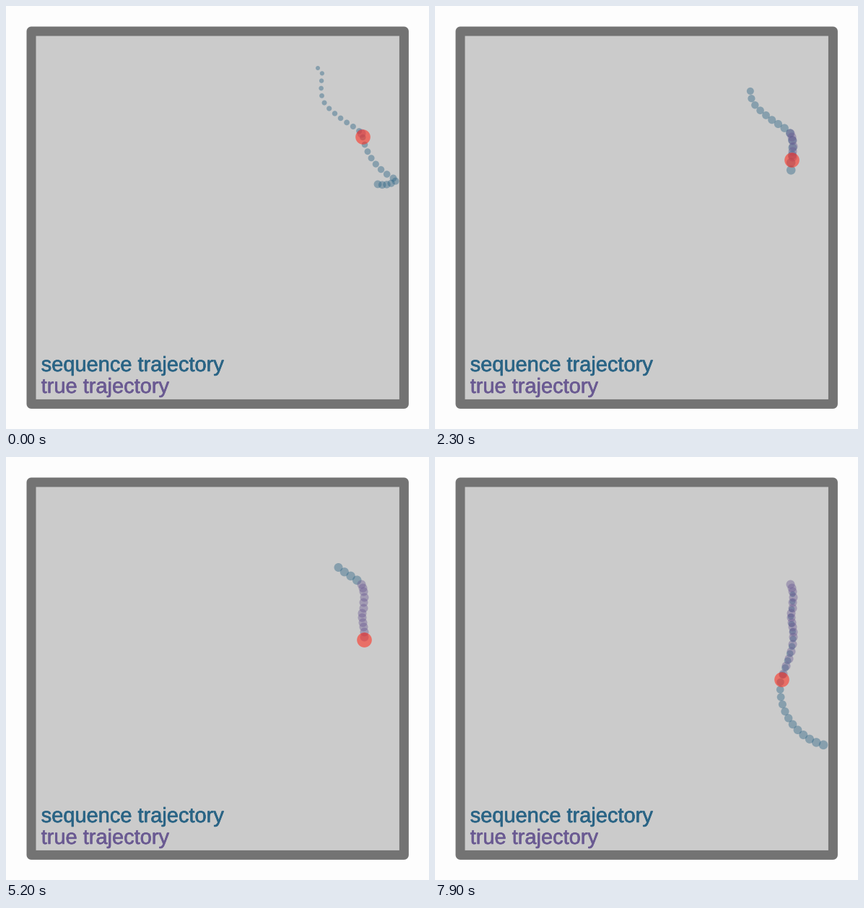
Write a matplotlib script that moves like this. It is 586 by 586 pixels and loops after 8 s.

```python
import numpy as np
import matplotlib.pyplot as plt
from matplotlib.animation import FuncAnimation
from matplotlib.patches import Rectangle
from matplotlib.patheffects import withStroke

SIZE, DPI = 586, 100
PX = 72 / DPI
FRAMES, INTERVAL = 80, 100
CYCLE = 5                 # frames per sweep
BEHIND, AHEAD = 13, 12    # sweep dots on the walked path and beyond it
STEP = 10.4               # spacing of the sweep dots
WALL = 542
BLUE, PURPLE, RED = "#2a6485", "#6a5a92", "#ff2d1e"

# Key points of the walked path, and the height reached at key times.
KEYS = [(432, 86), (438, 94), (436.5, 112), (441, 134), (463, 155), (489, 173),
        (495, 186), (495, 205), (493, 222), (496, 253), (489, 281), (479, 310),
        (477, 326)]
PACE = [(-5, 176), (5, 186), (20, 209), (50, 248.5), (85, 320)]

# First and last heading (degrees, 90 is down) of the sweeps that reach the wall.
WIDE = {-1: (75, -5), 1: (85, 30), 11: (115, 5), 15: (92, 12)}


def spline(keys, n=24):
    """Catmull-Rom curve through the key points."""
    k = np.array(keys, float)
    k = np.vstack([2 * k[0] - k[1], k, 2 * k[-1] - k[-2]])
    t = np.linspace(0, 1, n, endpoint=False)[:, None]
    parts = [b + t * (c - a) / 2 + t**2 * (a - 2.5 * b + 2 * c - d / 2)
             + t**3 * (1.5 * (b - c) + (d - a) / 2)
             for a, b, c, d in zip(k, k[1:], k[2:], k[3:])]
    return np.vstack(parts + [k[-2:-1]])


TRACK = spline(KEYS)
ARC = np.r_[0, np.cumsum(np.hypot(*np.diff(TRACK, axis=0).T))]


def track_at(dist):
    return np.column_stack([np.interp(dist, ARC, axis) for axis in TRACK.T])


def walked(frame):
    """Distance along the track at a given frame."""
    y = np.interp(frame, *np.transpose(PACE))
    return np.interp(y, TRACK[:, 1], ARC)


def sweep(cycle):
    """Dots along the walked path, then along a steadily turning one."""
    past = track_at(walked(CYCLE * cycle + 6) + STEP * np.arange(1 - BEHIND, 1))
    side = 1 if cycle % 2 else -1
    first, last = WIDE.get(cycle, (90, 90 - 30 * side))
    heading = np.radians(np.linspace(first, last, AHEAD))
    moves = STEP * np.column_stack([np.cos(heading), np.sin(heading)])
    dots = np.vstack([past, past[-1] + np.cumsum(moves, axis=0)])
    over = np.maximum(dots[:, 0] - WALL, 0)
    dots[:, 0] -= 1.6 * over          # damped bounce off the wall
    return dots


def area(radius):
    return (2 * np.asarray(radius) * PX) ** 2


SWEEPS = {c: sweep(c) for c in range(-1, FRAMES // CYCLE)}
STAMP_TIMES = np.arange(-CYCLE, FRAMES, CYCLE)
STAMPS = track_at(walked(STAMP_TIMES))

fig = plt.figure(figsize=(SIZE / DPI, SIZE / DPI), dpi=DPI, facecolor="#fdfdfd")
ax = fig.add_axes([0, 0, 1, 1])
ax.set(xlim=(0, SIZE), ylim=(SIZE, 0))
ax.axis("off")

ax.add_patch(Rectangle((35, 35), 516.4, 516.4, fc="#cbcbcb", ec="none", zorder=0))
ax.add_patch(Rectangle((35, 35), 516.4, 516.4, fill=False, ec="#737373",
                       lw=13 * PX, joinstyle="round", snap=False, zorder=5))
ax.plot([0, SIZE], [585.5, 585.5], color="#c4c4c4", lw=PX, zorder=5)
for label, y, color in (("sequence trajectory", 506, BLUE),
                        ("true trajectory", 536, PURPLE)):
    ax.text(48.7, y, label, color=color, family="Liberation Sans",
            fontsize=29 * PX, va="baseline", zorder=6,
            path_effects=[withStroke(linewidth=0.6 * PX, foreground=color)])


def dots(color, alpha, zorder, radius=1):
    return ax.scatter([], [], s=area(radius), color=color, alpha=alpha,
                      linewidths=0, zorder=zorder)


blue = dots(BLUE, 0.42, 1)
purple = dots(PURPLE, 0.42, 2, 6)
agent = dots(RED, 0.58, 3, 10.3)


def draw(frame):
    cycle = (frame - 1) // CYCLE
    phase = frame - CYCLE * cycle
    n = int(np.clip(10 * phase - 16, 0, BEHIND + AHEAD))
    age = phase - 1.6 - np.arange(n) / 10
    blue.set_offsets(SWEEPS[cycle][:n])
    blue.set_sizes(area(6.4 - age))
    purple.set_offsets(STAMPS[STAMP_TIMES < frame])
    agent.set_offsets(track_at([walked(frame)]))
    return blue, purple, agent


anim = FuncAnimation(fig, draw, frames=FRAMES, interval=INTERVAL, repeat=True)
plt.show()
```
